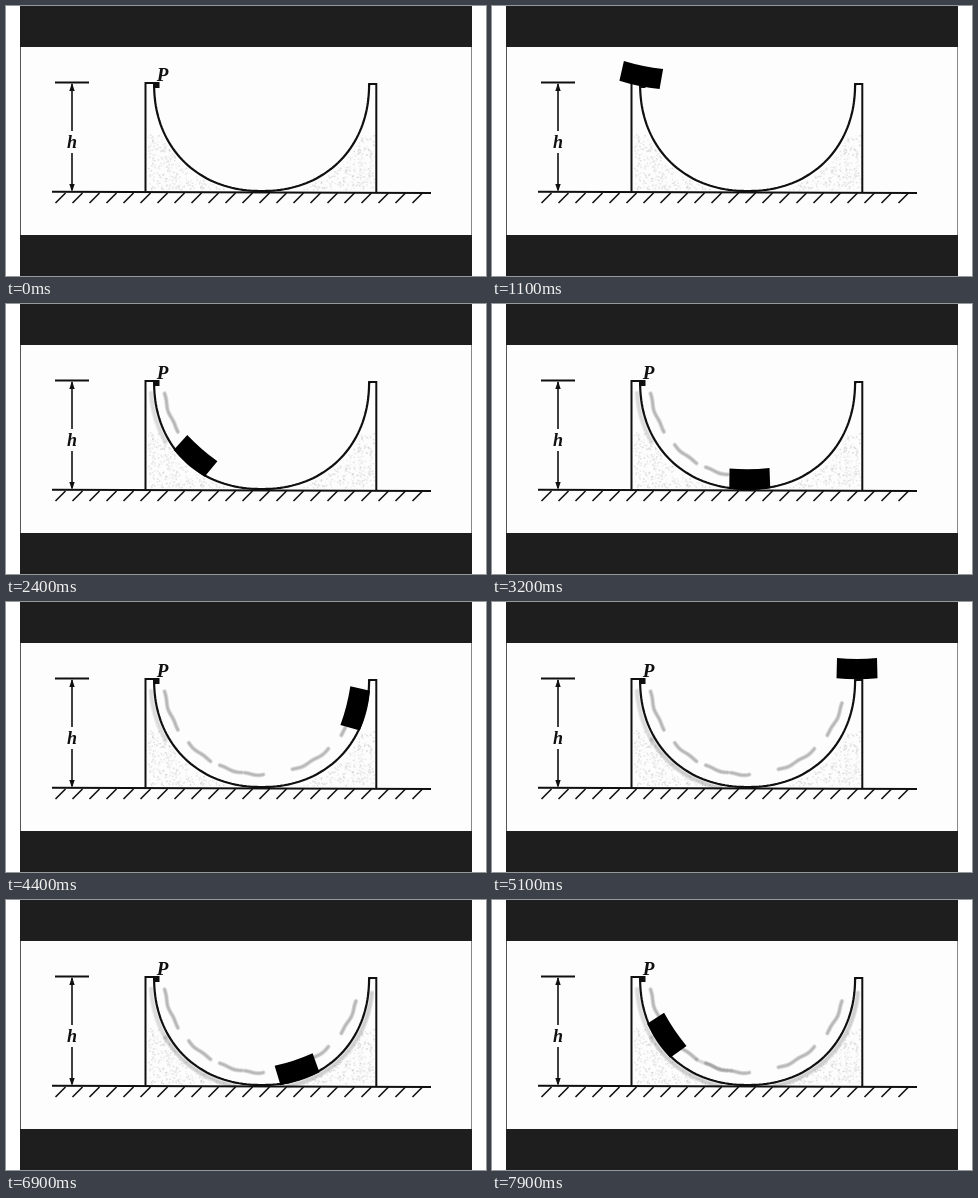
Write an HTML page with a canvas that moves like this. It is 480 px wide and 270 px high and loops after 8 s.

```html
<!DOCTYPE html>
<html lang="en">
<head>
<meta charset="utf-8">
<title>Block sliding in a bowl</title>
<style>
html, body { margin: 0; width: 100%; height: 100%; overflow: hidden; background: #fff; }
canvas { display: block; }
</style>
</head>
<body>
<canvas id="stage" width="480" height="270"></canvas>
<script>
const ctx = document.getElementById('stage').getContext('2d');
const LOOP = 8000, STEP = 100;
// The bowl is a slightly squared circle
const BOWL = { x: 255.6, y: 77.5, r: 107.5, power: 2.15 };
const INK = '#101010';
const RAD = Math.PI / 180;

// [time, degrees along the bowl]; 0 is the left rim, 180 the right rim
const KEYS = [
  [1000, -14], [1300, -6], [1600, 5.5], [1700, 11], [3200, 91.2], [4400, 163],
  [4700, 180], [5100, 194], [5600, 194], [5700, 191], [5900, 178.5],
  [6000, 172.9], [6900, 111], [7400, 71], [7900, 35.5]
];
const DASHES = [[7, 31], [41, 58], [64, 78], [80, 91], [109, 134], [145, 166]];

const lerp = (a, b, k) => a + (b - a) * k;

function slideAt(time) {
  for (let i = 1; i < KEYS.length; i++) {
    const [t0, a0] = KEYS[i - 1], [t1, a1] = KEYS[i];
    if (time <= t1) return lerp(a0, a1, (time - t0) / (t1 - t0));
  }
  return KEYS[KEYS.length - 1][1];
}

function polar(angle, radius) {
  return [BOWL.x - radius * Math.cos(angle * RAD), BOWL.y + radius * Math.sin(angle * RAD)];
}

function bowlStretch(angle) {
  const c = Math.abs(Math.cos(angle * RAD)), s = Math.abs(Math.sin(angle * RAD));
  return (c ** BOWL.power + s ** BOWL.power) ** (-1 / BOWL.power);
}

const bowlPoint = (angle, inset = 0) => polar(angle, (BOWL.r - inset) * bowlStretch(angle));

function path(points, width, color = INK) {
  ctx.beginPath();
  points.forEach(([x, y]) => ctx.lineTo(x, y));
  ctx.lineWidth = width;
  ctx.strokeStyle = color;
  ctx.stroke();
}

function fillShape(points, color = INK) {
  ctx.beginPath();
  points.forEach(([x, y]) => ctx.lineTo(x, y));
  ctx.fillStyle = color;
  ctx.fill();
}

function curve(from, to, pointAt) {
  const points = [];
  for (let a = from; a < to; a += 2) points.push(pointAt(a));
  points.push(pointAt(to));
  return points;
}

function smear(from, to, pointAt, width, alpha) {
  const points = curve(from, to, pointAt);
  ctx.lineCap = ctx.lineJoin = 'round';
  for (const extra of [1.5, 0, -1.5]) {
    path(points, width + extra, `rgba(125,125,125,${alpha * 0.4})`);
  }
  ctx.lineCap = 'butt';
  ctx.lineJoin = 'miter';
}

// Fine grain in the solid parts below the curve
function drawGrain() {
  let seed = 17;
  const random = () => (seed = (seed * 16807) % 2147483647) / 2147483647;
  for (let i = 0; i < 1800; i++) {
    const x = 142 + random() * 226, y = 128 + random() * 55;
    const shade = 200 + Math.floor(random() * 45);
    const angle = Math.atan2(y - BOWL.y, BOWL.x - x) / RAD;
    if (Math.hypot(x - BOWL.x, y - BOWL.y) < BOWL.r * bowlStretch(angle) + 3) continue;
    ctx.fillStyle = `rgba(${shade},${shade},${shade},.6)`;
    ctx.fillRect(x, y, 1.5, 1.5);
  }
}

function drawFrame() {
  ctx.fillStyle = '#fff';
  ctx.fillRect(0, 0, 480, 270);
  ctx.fillStyle = '#fdfdfd';
  ctx.fillRect(15, 41, 450, 188);
  ctx.fillStyle = '#1e1e1e';
  ctx.fillRect(14, 0, 452, 41);
  ctx.fillRect(14, 229, 452, 41);
  path([[14.5, 41], [14.5, 229]], 1, '#555');
  path([[465.5, 41], [465.5, 229]], 1, '#888');
}

function drawDiagram() {
  path([[46, 185.7], [425, 187]], 2.1);
  for (let i = 0; i < 22; i++) {
    const x = 59.5 + i * 17;
    path([[x, 187], [x - 10, 197]], 1.6);
  }

  path([[49, 76.5], [83, 76.5]], 1.8);
  path([[66, 78], [66, 125]], 1.6);
  path([[66, 147], [66, 184]], 1.6);
  fillShape([[66, 77], [63.3, 85], [68.7, 85]]);
  fillShape([[66, 186], [63.3, 178], [68.7, 178]]);

  path([[139.5, 186], [139.5, 77], [148, 77], [148, 80]], 2);
  path([[370.3, 187], [370.3, 78], [363.2, 78], [363.2, 80]], 2);
  path(curve(0, 180, a => bowlPoint(a)), 2.2);

  ctx.fillStyle = INK;
  ctx.fillRect(147.5, 76, 6, 6);
  ctx.textAlign = 'center';
  ctx.font = 'italic bold 18px "Liberation Serif", serif';
  ctx.fillText('h', 66, 142);
  ctx.font = 'italic bold 19px "Liberation Serif", serif';
  ctx.fillText('P', 156.5, 74.5);
}

function drawTrail(time) {
  const reach = slideAt(Math.min(time, 5100)) - 13;
  const under = a => bowlPoint(a, -3.5);
  if (reach > 6) smear(6, Math.min(reach, 32), under, 4, 0.25);
  if (time >= 4700) smear(32, 76, under, 4, 0.35);
  if (time >= 5300) smear(104, 172, under, 4, 0.35);

  const wobble = a => polar(a, 96.5 + 1.3 * Math.cos(2 * a * RAD) + 0.6 * Math.sin(a * 0.45));
  for (const [from, to] of DASHES) {
    if (reach > from) smear(from, Math.min(to, reach), wobble, 3, 0.6);
  }
  if (time >= 7500) smear(58, 80, wobble, 3, 0.3);
}

function drawBlock(slide) {
  const held = Math.max(6, Math.min(174, slide));
  const tip = Math.min(1, Math.abs(slide - held) / 20);
  const [x, y] = bowlPoint(held, 10.2);
  const [x0, y0] = bowlPoint(held - 1), [x1, y1] = bowlPoint(held + 1);
  const tilt = Math.atan2(y1 - y0, x1 - x0);
  const ledge = slide < 90 ? 148 : 365;
  ctx.save();
  ctx.translate(lerp(x, ledge, tip), lerp(y, 66.5, tip));
  ctx.rotate(lerp(tilt, 0, tip));
  ctx.beginPath();
  ctx.moveTo(-20, -10.5);
  ctx.quadraticCurveTo(0, -8.5, 20, -10.5);
  ctx.lineTo(20.5, 9.7);
  ctx.quadraticCurveTo(0, 12, -20.5, 9.7);
  ctx.closePath();
  ctx.fillStyle = '#000';
  ctx.fill();
  ctx.restore();
}

function render(now) {
  const time = Math.floor((now % LOOP) / STEP) * STEP;
  drawFrame();
  drawGrain();
  if (time >= 1000) drawTrail(time);
  drawDiagram();
  if (time >= 1000) drawBlock(slideAt(time));
}

const start = performance.now();
function tick() {
  render(performance.now() - start);
  requestAnimationFrame(tick);
}
tick();
</script>
</body>
</html>
```
